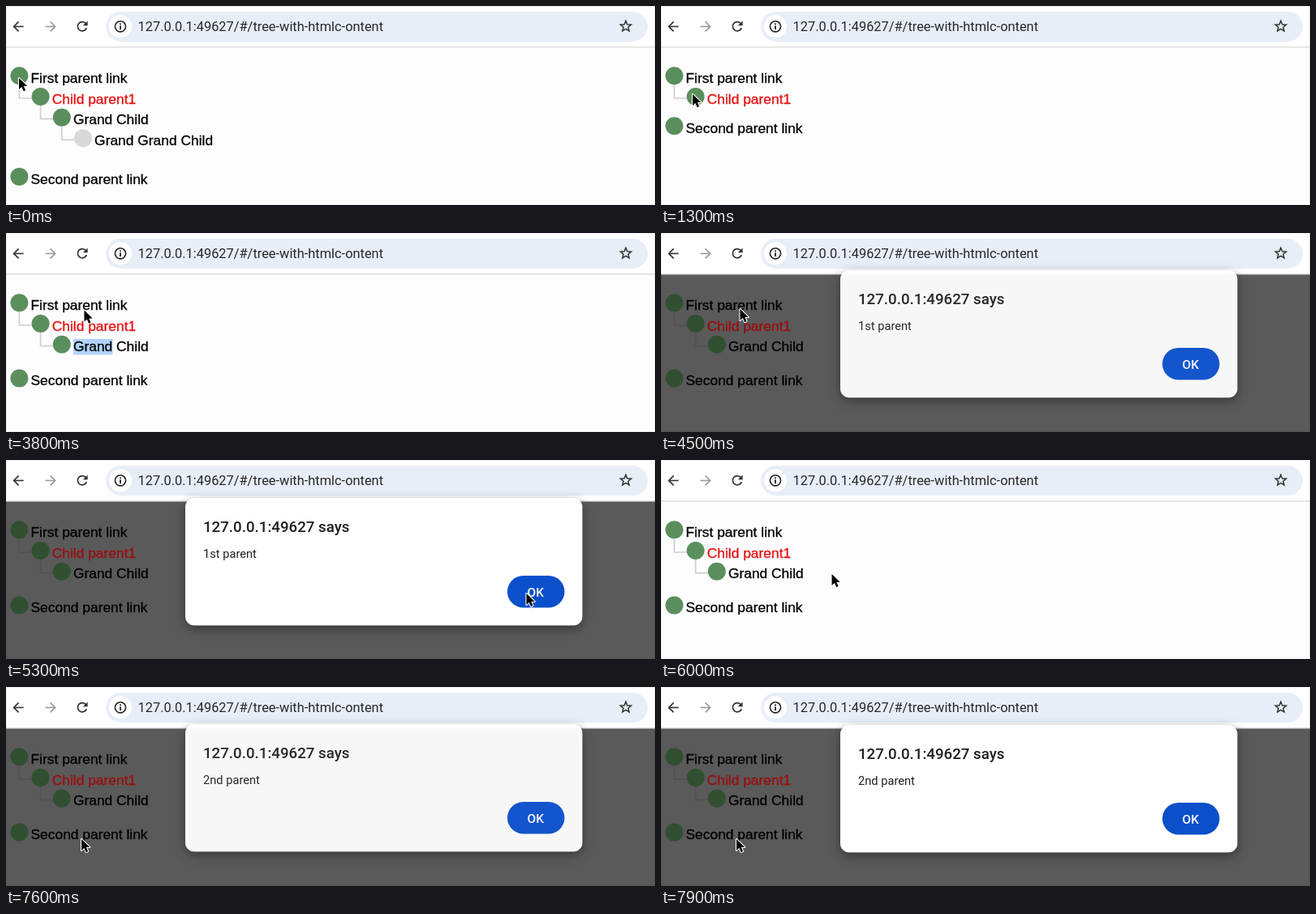
Animation of 800x246 px, one loop 8000 ms. Source, as an HTML page with a canvas:

```html
<!DOCTYPE html>
<html lang="en">
<head>
<meta charset="utf-8">
<title>Tree view</title>
<style>
html, body { margin: 0; width: 100%; height: 100%; overflow: hidden; background: #fff; }
canvas { display: block; }
</style>
</head>
<body>
<canvas id="stage" width="800" height="246"></canvas>
<script>
const ctx = document.getElementById('stage').getContext('2d');
const LOOP = 8000;
const UI = 'Roboto, sans-serif';
const PAGE = '"Liberation Sans", Arial, sans-serif';

const LIGHT = { page: '#fdfdfd', node: '#5a8f5d', leaf: '#d9d9d9', line: '#cfcfcf', red: '#e60f0f', text: '#000' };
const DIM = { page: '#5a5a5a', node: '#305031', leaf: '#4c4c4c', line: '#525252', red: '#9c0d0f', text: '#000' };

const LABELS = ['First parent link', 'Child parent1', 'Grand Child', 'Grand Grand Child'];

// [time, number of visible levels below the first parent]
const DEPTHS = [[0, 3], [100, 0], [500, 3], [1300, 1], [1700, 3], [2300, 2], [2500, 3], [2700, 2]];

// [time, x, y] of the pointer tip
const POINTER = [
  [0, 16, 89], [600, 16, 89], [1100, 39, 109], [1300, 39, 109], [1800, 39, 109],
  [2200, 66, 139], [3000, 66, 139], [3900, 97.5, 94], [4600, 97.5, 94],
  [5200, 641.5, 165], [5500, 641.5, 165], [6200, 104, 135], [6700, 104, 135],
  [7400, 93, 188], [LOOP, 93, 188]
];

const DIALOGS = [
  { from: 4500, to: 5500, text: '1st parent' },
  { from: 7600, to: LOOP, text: '2nd parent' }
];

function text(str, x, y, font, color) {
  ctx.font = font;
  ctx.fillStyle = color;
  ctx.fillText(str, x, y);
}

function disc(x, y, r, color) {
  ctx.fillStyle = color;
  ctx.beginPath();
  ctx.arc(x, y, r, 0, Math.PI * 2);
  ctx.fill();
}

function pill(x, y, w, h, r, color) {
  ctx.fillStyle = color;
  ctx.beginPath();
  ctx.roundRect(x, y, w, h, r);
  ctx.fill();
}

function stroke(points, color, width) {
  ctx.strokeStyle = color;
  ctx.lineWidth = width;
  ctx.beginPath();
  points.forEach(([x, y]) => ctx.lineTo(x, y));
  ctx.stroke();
}

function arrowIcon(x, dir, color) {
  const y = 25.4;
  stroke([[x - 6 * dir, y], [x + 6 * dir, y]], color, 1.6);
  stroke([[x, y - 6], [x + 6 * dir, y], [x, y + 6]], color, 1.6);
}

function reloadIcon(x, y) {
  ctx.strokeStyle = '#333';
  ctx.lineWidth = 1.7;
  ctx.beginPath();
  ctx.arc(x, y, 5.6, 0.35, Math.PI * 1.78);
  ctx.stroke();
  ctx.fillStyle = '#333';
  ctx.beginPath();
  ctx.moveTo(x + 6.6, y - 6.8);
  ctx.lineTo(x + 6.6, y - 1);
  ctx.lineTo(x + 0.8, y - 1);
  ctx.fill();
}

function starIcon(x, y) {
  ctx.strokeStyle = '#333';
  ctx.lineWidth = 1.5;
  ctx.beginPath();
  for (let i = 0; i < 10; i++) {
    const r = i % 2 ? 3.1 : 7;
    const a = i * Math.PI / 5 - Math.PI / 2;
    ctx.lineTo(x + r * Math.cos(a), y + r * Math.sin(a));
  }
  ctx.closePath();
  ctx.stroke();
}

function drawToolbar() {
  ctx.fillStyle = '#fff';
  ctx.fillRect(0, 0, 800, 50);
  ctx.fillStyle = '#dfdfdf';
  ctx.fillRect(0, 50, 800, 1.5);
  arrowIcon(15.6, -1, '#333');
  arrowIcon(54.6, 1, '#999');
  reloadIcon(94, 25.2);
  pill(123, 7, 668, 37, 18.5, '#e8eef7');
  disc(141, 25.3, 14, '#fff');
  ctx.strokeStyle = '#222';
  ctx.lineWidth = 1.6;
  ctx.beginPath();
  ctx.arc(141, 25.3, 6.6, 0, Math.PI * 2);
  ctx.stroke();
  ctx.fillStyle = '#222';
  ctx.fillRect(140.1, 24.3, 1.8, 4.8);
  ctx.fillRect(140.1, 21.4, 1.8, 1.8);
  text('127.0.0.1:49627/#/tree-with-htmlc-ontent', 162.5, 31, '16.4px ' + UI, '#27282b');
  starIcon(764, 25.3);
}

function drawNode(x, y, label, dotColor, textColor) {
  disc(x + 0.4, y - 0.4, 11, dotColor);
  text(label, x + 14.5, y + 8.3, '17.4px ' + PAGE, textColor);
  // a hairline outline gives the slightly heavier text rendering
  ctx.strokeStyle = textColor;
  ctx.lineWidth = 0.3;
  ctx.strokeText(label, x + 14.5, y + 8.3);
}

function drawTree(depth, selected, colors) {
  const place = i => [16 + i * 26.2, 86.7 + i * 25.7];
  for (let i = 0; i < depth; i++) {
    const [x, y] = place(i);
    stroke([[x + 0.4, y + 10], [x + 0.4, y + 27.3], [x + 16, y + 27.3]], colors.line, 1.7);
  }
  if (selected) {
    ctx.fillStyle = '#b0d2fc';
    ctx.fillRect(83, 131, 48.5, 19.5);
  }
  for (let i = 0; i <= depth; i++) {
    drawNode(...place(i), LABELS[i],
      i === 3 ? colors.leaf : colors.node, i === 1 ? colors.red : colors.text);
  }
  drawNode(16, 117.4 + depth * 31.3, 'Second parent link', colors.node, colors.text);
}

function drawDialog(dialog, t) {
  const entering = t - dialog.from < 100;
  ctx.save();
  ctx.translate(0, entering ? -1 : 0);
  ctx.globalAlpha = entering ? 0.96 : 1;
  ctx.shadowColor = 'rgba(0,0,0,0.4)';
  ctx.shadowBlur = 14;
  ctx.shadowOffsetY = 4;
  pill(221, 47, 489.5, 157.5, 11, '#fff');
  ctx.shadowColor = 'transparent';
  text('127.0.0.1:49627 says', 243, 89, '500 18.7px ' + UI, '#1f1f1f');
  text(dialog.text, 243, 120.5, '14.65px ' + UI, '#1f1f1f');
  pill(618, 143, 70.5, 39.5, 19.75, '#0b4fcb');
  text('OK', 642.5, 168.5, '500 15.5px ' + UI, '#fff');
  ctx.restore();
}

function drawPointer(x, y) {
  ctx.save();
  ctx.translate(x, y);
  ctx.scale(0.88, 0.88);
  ctx.beginPath();
  [[0, 0], [0, 16], [3.8, 12.6], [6.4, 18.4], [9.2, 17.2], [6.7, 11.5], [11.6, 11.3]]
    .forEach(([px, py]) => ctx.lineTo(px, py));
  ctx.closePath();
  ctx.lineJoin = 'round';
  ctx.strokeStyle = '#fff';
  ctx.lineWidth = 2.4;
  ctx.stroke();
  ctx.fillStyle = '#000';
  ctx.fill();
  ctx.restore();
}

function pointerAt(t) {
  const next = Math.max(1, POINTER.findIndex(p => p[0] > t));
  const [t0, x0, y0] = POINTER[next - 1];
  const [t1, x1, y1] = POINTER[next];
  const k = (t - t0) / (t1 - t0);
  const ease = k * k * (3 - 2 * k);
  return [x0 + (x1 - x0) * ease, y0 + (y1 - y0) * ease];
}

function draw(t) {
  const dialog = DIALOGS.find(d => t >= d.from && t < d.to);
  const colors = dialog ? DIM : LIGHT;
  const depth = DEPTHS.filter(d => d[0] <= t).pop()[1];
  ctx.fillStyle = colors.page;
  ctx.fillRect(0, 0, 800, 246);
  drawToolbar();
  drawTree(depth, t >= 2700 && t < 4300, colors);
  ctx.strokeStyle = 'rgba(0,0,0,0.06)';
  ctx.lineWidth = 1;
  ctx.strokeRect(0.5, 0.5, 799, 245);
  if (dialog) drawDialog(dialog, t);
  drawPointer(...pointerAt(t));
}

const start = performance.now();
function tick() {
  const elapsed = performance.now() - start;
  draw(Math.floor((elapsed % LOOP) / 100) * 100);
  requestAnimationFrame(tick);
}
tick();
</script>
</body>
</html>
```
